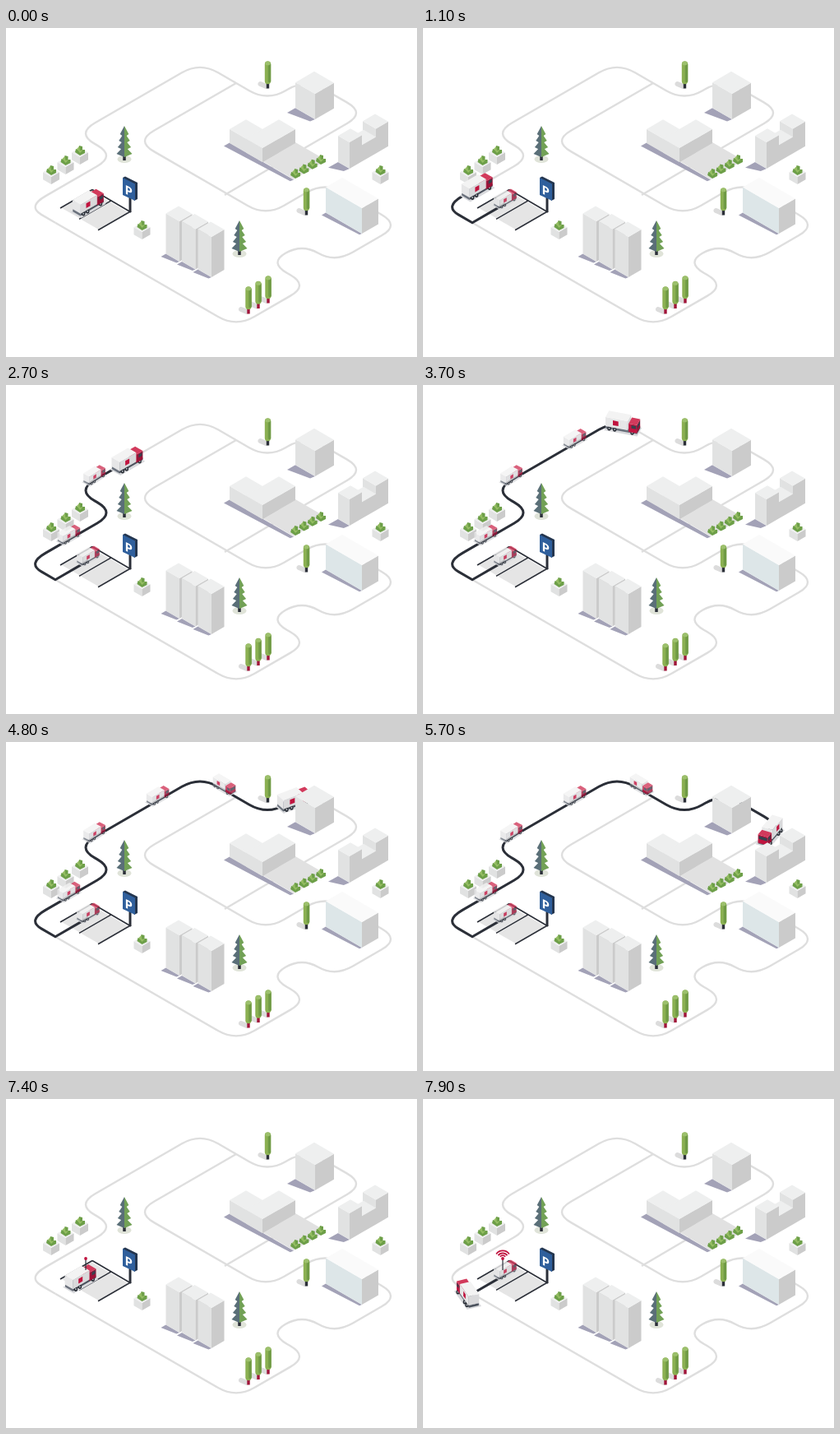
Write an HTML page that moves like this. It is 500x400 px and loops after 8000 ms.

```html
<!DOCTYPE html>
<html lang="en">
<head>
<meta charset="utf-8">
<title>Truck route</title>
<style>
html, body { margin: 0; width: 100%; height: 100%; overflow: hidden; background: #fff; }
svg { display: block; width: 500px; height: 400px; }
.line { fill: none; stroke-linejoin: round; }
</style>
</head>
<body>
<svg viewBox="0 0 500 400">
  <g id="roads" class="line" stroke="#dedede" stroke-width="2.4"></g>
  <g id="back"></g>
  <path id="trail" class="line" stroke="#2b2f38" stroke-width="3"/>
  <g id="cars"></g>
  <g id="front"></g>
  <g id="signal"></g>
</svg>
<script>
const $ = id => document.getElementById(id);
const LOOP = 8000, ARRIVE = 6400, RESET = 7200;
const K = 1 / Math.sqrt(3);            // slope of the isometric axes
const EXIT = 46;                       // distance backed out of the bay
const RED = '#c0143f', DARK = '#2b2f38';
const SHADE = '#a3a2b7', TOP = '#eeefef', LEFT = '#e1e2e2', RIGHT = '#cbcbcb';
const clamp = (v, lo, hi) => Math.min(hi, Math.max(lo, v));
const repeat = (n, draw) => Array.from({ length: n }, (_, i) => draw(i)).join('');

// ---- roads: isometric zigzags given by the x of each corner, then rounded ----
function route(x, y, slope, xs) {
  const pts = [[x, y]];
  for (const nx of xs) {
    y += slope * (nx - x);
    pts.push([x = nx, y]);
    slope = -slope;
  }
  const toward = ([ax, ay], [bx, by]) => {
    const dx = Math.abs(bx - ax), f = Math.min(22, dx / 2) / dx;
    return [ax + (bx - ax) * f, ay + (by - ay) * f];
  };
  let d = `${pts[0]}`;
  for (let i = 1; i < pts.length - 1; i++)
    d += `L${toward(pts[i], pts[i - 1])}Q${pts[i]} ${toward(pts[i], pts[i + 1])}`;
  return d + `L${pts.at(-1)}`;
}

const mainRoad = route(60, 236.7, K, [26, 133, 86, 236, 318, 365, 437, 358]);
const outerRoad = route(280, 67, -K, [158, 316, 388, 479, 400, 360, 320, 368, 280, 60]);
$('roads').innerHTML = [mainRoad, outerRoad, '358 149L266 203'].map(d => `<path d="M${d}"/>`).join('');
const trail = $('trail');
trail.setAttribute('d', 'M100 213.6L' + mainRoad);
const total = trail.getTotalLength();

// ---- drawing helpers, all returning SVG markup ----
const poly = (fill, ...pts) => `<polygon fill="${fill}" points="${pts.join(' ')}"/>`;
const line = (x1, y1, x2, y2, color, w, cap = 'butt') =>
  `<path d="M${x1} ${y1}L${x2} ${y2}" stroke="${color}" stroke-width="${w}" stroke-linecap="${cap}"/>`;
const oval = (x, y, rx, ry, fill) => `<ellipse cx="${x}" cy="${y}" rx="${rx}" ry="${ry}" fill="${fill}"/>`;

// Block standing on its front corner (x, y), a wide to the left and b to the right.
function block(x, y, a, b, h, top = TOP, left = LEFT) {
  const t = y - h;
  return poly(left, [x, y], [x - a, y - a * K], [x - a, t - a * K], [x, t]) +
    poly(RIGHT, [x, y], [x + b, y - b * K], [x + b, t - b * K], [x, t]) +
    poly(top, [x, t], [x - a, t - a * K], [x - a + b, t - (a + b) * K], [x + b, t - b * K]);
}

const shadow = (x, y, a, w) => poly(SHADE, [x, y], [x - a, y - a * K],
  [x - a - w, y - a * K + w * K], [x - w * .6, y + w * .25]);

const shrub = (x, y) =>
  poly('#6d9f48', [x - 6, y - 1], [x - 5, y - 5], [x - 2, y - 4], [x - 1, y - 9], [x + 3, y - 8],
    [x + 3, y - 4], [x + 6, y - 4], [x + 6, y], [x, y + 3]) +
  poly('#94bd62', [x - 4, y - 5], [x - 1, y - 8], [x, y - 3], [x + 4, y - 4], [x, y]);

const planter = (x, y) => block(x, y, 10, 10, 9) + shrub(x, y - 14);

const roundTree = (x, y, trunk) =>
  line(x - 9, y + 28, x - 2, y + 31, '#dcdcdc', 6, 'round') +
  line(x, y + 26, x, y + 33.5, trunk, 3.4) +
  line(x, y + 4, x, y + 24.5, '#8bb052', 7.4, 'round') +
  line(x + 2, y + 4, x + 2, y + 24.5, '#6f9a45', 3.4, 'round') +
  oval(x, y + 3, 3.2, 2.3, '#9cc06c');

function pine(x, y) {
  const tier = i => {
    const top = y + 24 - 8 * i, low = top + 12, w = 9.5 - 1.4 * i;
    return poly('#5a6f78', [x, top - 1], [x - w, low - 3], [x, low + 1]) +
      poly('#72a156', [x, top - 1], [x + w, low - 3], [x, low + 1]);
  };
  return oval(x, y + 39.5, 8.5, 4.5, '#dfe3d8') + line(x, y + 30, x, y + 41, DARK, 3.5) + repeat(4, tier);
}

// ---- trucks: prisms turned by angle a on the ground, then projected ----
function truck(cx, cy, a, k) {
  const c = Math.cos(a), s = Math.sin(a);
  const at = (x, y, z) => {
    const u = c * x - s * y, v = s * x + c * y;
    return [(cx + (u - v) * .866 * k).toFixed(1), (cy + ((u + v) / 2 - z) * k).toFixed(1)];
  };
  const side = c - s > 0 ? 1 : -1, end = c + s > 0 ? 1 : -1;
  const sidePanel = (fill, x0, x1, z0, z1, y) =>
    poly(fill, at(x0, y, z0), at(x1, y, z0), at(x1, y, z1), at(x0, y, z1));
  const endPanel = (fill, x, w, z0, z1) =>
    poly(fill, at(x, -w, z0), at(x, w, z0), at(x, w, z1), at(x, -w, z1));
  function prism(x0, x1, w, z0, z1, [top, left, right]) {
    return sidePanel(side * (s + c) < 0 ? right : left, x0, x1, z0, z1, side * w) +
      endPanel(end * (c - s) > 0 ? right : left, end > 0 ? x1 : x0, w, z0, z1) +
      poly(top, at(x0, -w, z1), at(x1, -w, z1), at(x1, w, z1), at(x0, w, z1));
  }
  const wheel = x => {
    const [wx, wy] = at(x, side * 6, 2);
    return oval(wx, wy, 2.3 * k, 2.8 * k, '#272b33') + oval(wx, wy, k, 1.2 * k, '#aab0b8');
  };
  const base = poly('#d9dadd', at(-18, -8, 0), at(18, -8, 0), at(18, 8, 0), at(-18, 8, 0)) +
    prism(-17, 17, 5.5, 1, 4, ['#6a717c', '#6a717c', '#4b525d']) + [-13, -7, 12].map(wheel).join('');
  const cargo = prism(-17, 7, 6, 4, 15.5, ['#f3f3f3', '#e6e6e7', '#d9d9db']) +
    sidePanel(RED, -9, -3, 7, 13, side * 6);
  const cab = prism(8, 17, 5.6, 2, 12.5, ['#d23a5c', RED, '#9c1237']) +
    sidePanel('#39404d', 11, 16, 7, 11, side * 5.6) +
    (end > 0 ? endPanel('#39404d', 17, 4.8, 7, 11) : '');
  return base + (end > 0 ? cargo + cab : cab + cargo);
}

function truckOnRoad(s, size, lift) {
  const p = trail.getPointAtLength(s);
  const p0 = trail.getPointAtLength(Math.max(s - 8, EXIT + 1));
  const p1 = trail.getPointAtLength(Math.max(s + 8, EXIT + 10));
  const dx = (p1.x - p0.x) * K, dy = p1.y - p0.y;
  let a = Math.atan2(dy - dx, dy + dx);
  if (a > 2.3) a -= 2 * Math.PI;
  // It backs out of the bay and then swings round onto the road.
  const turn = clamp((s - 35) / 38, 0, 1);
  a = -Math.PI / 2 + turn * (a + Math.PI / 2);
  const swing = 11 * Math.exp(-(((s - 60) / 14) ** 2));
  return truck(p.x + swing, p.y + swing - lift, a, size);
}

function wifi(x, y, n) {
  const arc = i => {
    const r = 3.8 + 2.9 * i, w = r * .82, h = r * .57;
    return `<path class="line" d="M${x - w} ${y - h}A${r} ${r} 0 0 1 ${x + w} ${y - h}" stroke="${RED}" stroke-width="1.7"/>`;
  };
  return (n > 0 ? line(x, y, x, y + 14, DARK, 1.2) : '') +
    (n > 1 ? oval(x, y, 1.9, 1.9, RED) : '') + repeat(Math.max(0, n - 2), arc);
}

// ---- scenery ----
function bay(i) {
  const x = 66 + 23 * i, y = 219 + 13.4 * i;
  const fill = poly('#e5e5e5', [x + 2, y], [x + 38, y - 20.8], [x + 59, y - 8.6], [x + 23, y + 12]);
  return (i < 2 ? fill : '') + line(x, y, x + 39, y - 22.5, DARK, 1.6);
}

$('back').innerHTML =
  repeat(3, bay) + line(105, 196.5, 152, 224, DARK, 1.6) +
  roundTree(318.5, 40, DARK) + pine(144, 120) +
  repeat(3, i => planter(90 - 17.5 * i, 166 + 12 * i)) +
  // L-shaped building with a forecourt
  shadow(350, 184.5, 78, 7) +
  poly('#e1e1e1', [312, 162], [352, 139], [390, 161], [350, 184]) +
  block(312, 163, 40, 20, 17) + block(312, 163, 20, 40, 17);

$('front').innerHTML =
  // tower
  shadow(376, 111, 24, 10) + block(376, 111, 24, 23, 31) +
  repeat(4, i => shrub(383 - 10.3 * i, 163 + 5.7 * i)) +
  // stepped building
  shadow(418, 171, 14, 12) +
  block(450, 152.5, 16, 15, 30) + block(433, 162.3, 15, 17, 20) + block(418, 171, 14, 15, 32) +
  planter(455.5, 190) + roundTree(365.5, 194, DARK) +
  // pale hall
  shadow(433, 250, 44, 5) + block(433, 250, 44, 20, 31, '#fafafa', '#dde6e8') +
  // three slabs
  repeat(3, i => {
    const x = 211 + 19.5 * i, y = 284 + 9.5 * i;
    return shadow(x, y, 16.5, 6) + block(x, y, 16.5, 15.5, 49);
  }) +
  planter(165.5, 257) + pine(284, 235) +
  repeat(3, i => roundTree(319 - 12 * i, 301 + 6.5 * i, '#a01238')) +
  // parking sign
  line(151, 205, 151, 224, DARK, 3) +
  poly('#24364f', [142, 182], [145, 180.5], [160, 188], [160, 208], [156, 210]) +
  poly('#2f5f9c', [142, 182], [157, 189.5], [157, 210], [142, 203]) +
  '<text transform="matrix(1 .5 0 1 144.5 201)" font-family="Open Sans, Arial, sans-serif" font-weight="700" font-size="15" fill="#fff">P</text>';

// Distances along the trail at which a small truck stays behind.
const stops = [0, 130, 243, 332, 421, 622];

let last = -1;
function frame(now) {
  const t = Math.floor(now % LOOP / 100) * 100;
  if (t !== last) {
    last = t;
    const again = t >= RESET;
    const run = again ? Math.max(0, t - RESET - 100) : Math.min(t, ARRIVE);
    const s = total * run / ARRIVE;
    trail.setAttribute('stroke-dasharray', `${s} ${total + 9}`);
    trail.style.display = s ? '' : 'none';
    $('cars').innerHTML = '<g opacity=".8">' +
      stops.filter(d => s > d + 18).map(d => truckOnRoad(d, .7, 1.5)).join('') +
      '</g>' + truckOnRoad(s, .96, -5);
    const step = clamp((t - (again ? RESET : 6500)) / 100, 0, 5);
    $('signal').innerHTML = again ? wifi(97, 194, step) : wifi(353, 129.5, step);
  }
  requestAnimationFrame(frame);
}
requestAnimationFrame(frame);
</script>
</body>
</html>
```
